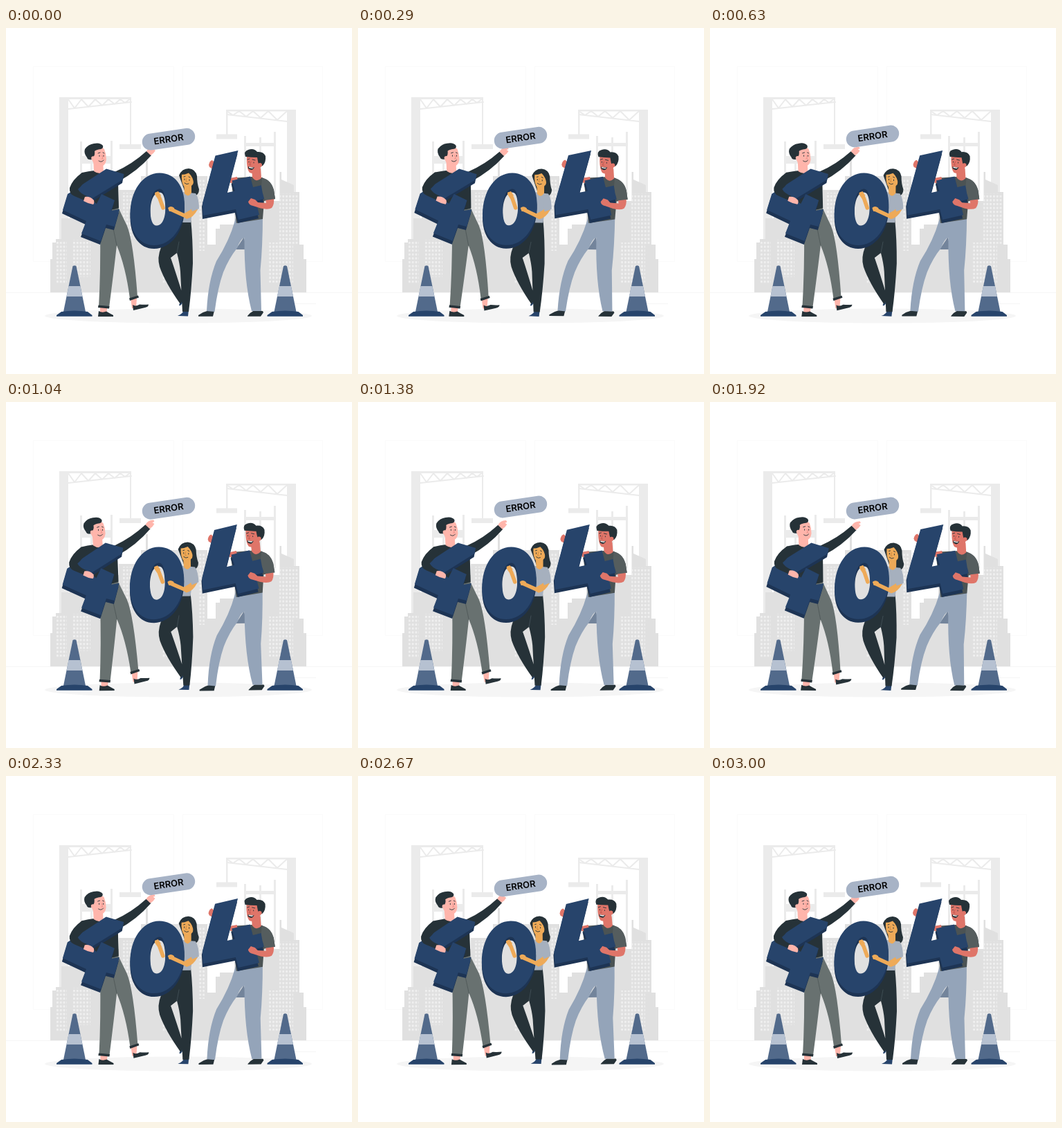
Write an HTML page that moves like this. It is 500 px wide and 500 px high and loops after 3040 ms.

```html
<!DOCTYPE html>
<html lang="en">
<head>
<meta charset="utf-8">
<title>Error 404</title>
<style>
html,body{margin:0;width:100%;height:100%;overflow:hidden;background:#fff}
svg{display:block;width:100%;height:100%}
.ink{fill:#263238}.navy{fill:#27446b}.deep{fill:#1d3454}
.pink{fill:#ffb5ab}.tan{fill:#eeaa58}.red{fill:#df7569}
.line{fill:none;stroke-linecap:round;stroke-linejoin:round}
text{font:600 13px Inter,"Open Sans",sans-serif;text-anchor:middle}
</style>
</head>
<body>
<svg viewBox="0 0 500 500">
<defs>
  <pattern id="dots" width="4.8" height="5.6" patternUnits="userSpaceOnUse"><path d="M1 1h2.8v3h-2.8z" fill="#f0f0f0"/></pattern>
  <g id="cone">
    <path d="M96.500 344Q99 342.500 101.500 344L115 410H83z" fill="#526a8b"/>
    <path d="M90.500 373H107.400L110.500 388H87.400z" fill="#b6c1d1"/>
    <path d="M73 415L80 410Q99 407 118 410L124.500 415V416.700H73z" class="navy"/>
  </g>
  <path id="four1" d="M145 203.500L170.500 211 169 219 122 248 131 254 138 240 157 249 152 264 164 262 157 287 145 284 137 308 109 297 116 279 82 263 89 240z"/>
  <path id="zero" fill-rule="evenodd" d="M222 209.500C244 209.500 258 229 258 255C258 288 239 314 214 314C193 314 179.500 295 179.500 269C179.500 236 197 209.500 222 209.500zM222 232.500C213 233 208.500 245 208.500 262C208.500 278 212 286 218 285.500C227 285 231 272 230.500 256C230 241 228 232.500 222 232.500z"/>
  <path id="four2" d="M302.500 184.500L335.500 177 319.500 238 331 235.500 326.500 220.500 353 214.500 357 230 370 227 373 247 361 250 366 270 336 277 332 262 285 271 284 253z"/>
</defs>

<!-- backdrop -->
<g fill="none" stroke="#fafafa"><path d="M39.500 55.500H242.500V337.500H39.500zM255.500 55.500H457.500V337.500H255.500z"/></g>
<path d="M0 382.500H500M402 398.500H448" stroke="#f5f5f5"/>
<g fill="#ebebeb">
  <path d="M77 100H90V310H77zM90 100H181V103H90zM179 100H181V168H179zM164 168H195V175H164z"/>
  <path d="M107 164H110V300H107zM122 168H125V300H122zM151 163H154V300H151zM107 185H154V196H107z"/>
  <path d="M406 118H419V240H406zM318 118H406V120.500H318zM318 118H320.500V154H318zM304 153.500H334V160.500H304z"/>
  <path d="M344 156H347V240H344zM366 158H369V240H366zM387 150H390V240H387zM344 166H390V171H344z"/>
</g>
<path class="line" stroke="#ebebeb" stroke-width="2" d="M90 117L181 107M90 103L99 116 109 103 119 114 129 103 139 112 148 103 157 110 165 103 172 108 180 102M319 125L406 135M319 120L328 126 337 120 347 128 357 120 368 130 379 120 392 133 406 120"/>
<path fill="#e0e0e0" d="M64 382V334H67V310H72V305H80V275H92V250H163V234H195V214H202V191H205V214H291V313H303V290H309V284H330V250H395.500V208H398V219L416 227V237H424V313H430V334H434V382z"/>
<path fill="url(#dots)" d="M73 307H88V370H73zM97 306H122V360H97zM167 238H187V304H167zM225 318H240V370H225zM279 217H289V322H279zM395 239H422V312H395zM379 310H415V368H379z"/>
<ellipse cx="249" cy="416" rx="193" ry="10.500" fill="#f5f5f5"/>
<use href="#cone"/><use href="#cone" x="304.500"/>

<!-- left man -->
<g id="man1">
  <path class="pink" d="M136 400H147L145 413H136zM180 390H189L188 405H182z"/>
  <path class="ink" d="M134 409Q139 412 145 409.500Q149 412 155 415V417H133zM183 400Q187 403 193 399.500Q200 400 206 399.500Q206 403 201 404L184 408z"/>
  <path fill="#687170" d="M137 257H161L175 286Q184 308 190 388L179 391Q173 345 160 314Q156 350 149 404H134Q137 350 136 290z"/>
  <path class="ink" d="M133.500 400.500L149.500 402 149 405.500 133 404zM178 390.500L191 386.500 192 389.500 179 394z"/>
  <path class="line" d="M160 314L154 285" stroke="#525b5b"/>
  <path class="ink" d="M110 209Q119 207 128 206L141 209 158 207.500Q182 197 203 178L210 184Q190 207 162 222L163 260Q150 265 136 262L118 250 100 244Q92 234 98 221z"/>
  <path class="pink" d="M126 190H140L141 209Q134 212 127 207z"/>
  <path class="pink" d="M203 178Q207 171 215 171.500L216 174 213 175 216 177 213 181 209 184z"/>
  <path class="pink" d="M124 178Q136 169 142 175Q145 182 145 190Q144 199 137 200Q127 199 124 190z"/>
  <path class="ink" d="M124 190Q118 191 117 187Q112 181 114 175Q119 168 127 167Q136 165 140 170Q141 174 137 175Q130 176 128 178Q129 183 126 187z"/>
  <circle class="pink" cx="126" cy="188" r="2.800"/>
  <path class="line" stroke="#263238" stroke-width=".9" d="M133 181L136 180M140 180L142 181M135 184V185.500M141 184V185.500M134 192Q138 195 141 191"/>
  <path class="line" stroke="#e98c86" stroke-width=".9" d="M138.500 184L140 189H138"/>
  <use href="#four1" x="-1" y="5" class="deep"/>
  <use href="#four1" class="navy"/>
  <path class="ink" d="M110 209Q96 219 92 231Q91 240 99 243L113 249 117 243Q107 239 104 233Q112 226 118 214z"/>
  <path class="pink" d="M114 244Q122 243 127 249Q128 253 126 255Q119 254 112 250z"/>
</g>

<!-- woman -->
<g id="woman">
  <path class="ink" d="M250 213Q254 203 264 203Q274 204 276 214Q276 225 279 233Q279 241 272 243L258 235z"/>
  <path class="navy" d="M250 401Q252 394 255 389L259 393 252 401zM248 416Q256 413 257 407H264L263 416.500z"/>
  <path class="ink" d="M244 276H267Q270 305 270 340Q268 380 264 410H255Q253 373 252 352Q251 340 247 325L238 332Q246 355 257 391L252 399Q230 368 222 345Q218 332 224 317z"/>
  <path class="line" stroke="#45535a" stroke-width=".8" d="M247 325L250 309"/>
  <path d="M255 237Q265 238 274 239Q280 247 277 263L269 267 267 281H246z" fill="#a6b0be"/>
  <path class="tan" d="M257 223H268V238Q263 246 258 239z"/>
  <path class="tan" d="M254 211Q262 203 270 210Q274 217 270 226Q265 232 258 230Q253 225 254 211z"/>
  <path class="ink" d="M252 212Q255 204 264 204Q275 207 274 223L271 225Q271 216 264 209.500Q259 212 252 212z"/>
  <path class="line" stroke="#263238" stroke-width=".9" d="M257 215L259 214.500M264 215L266 216M258 218V219.500M265 219V220.500M258 224Q261 227 264 225"/>
  <path class="line" stroke="#ca843b" stroke-width=".8" d="M261 217L260 222H262"/>
  <use href="#zero" x="0" y="5" class="deep"/>
  <use href="#zero" class="navy"/>
  <path class="line" stroke="#eeaa58" stroke-width="5.500" d="M218 240L222 246 227 260M274 260L260 272 238 262"/>
  <path class="tan" d="M215 238L220 236 224 242 222 246 217 243zM234 260Q238 256 243 260L244 265 236 265zM268 262H277Q271 274 261 276L254 270z"/>
  <path d="M268 240Q279 240 279 261L269 265Q264 252 268 240z" fill="#a6b0be"/>
</g>

<!-- right man -->
<g id="man2">
  <path class="ink" d="M278 415Q285 410 292 408.500H301L299 416.700H278zM349 416Q353 411 358 408.500L371 409 372 411 368 416.700H349z"/>
  <path fill="#73849b" d="M332 320L344 302 347 320z"/>
  <path fill="#94a4b9" d="M333 270H371Q371 315 367.500 350L369 409H355Q344 367 344.500 303Q339 304 334 318Q322 333 314 353Q306 375 301.500 410L290 409Q292 366 304 337Q323 307 331 278z"/>
  <path fill="#4b5354" d="M325 217L355 215 370 216Q383 220 387 234L389 247 373 250 371 276 333 282z"/>
  <path class="red" d="M355 203H368L369 217Q362 224 356 216zM324 217L334 215 335 222 324 224z"/>
  <path class="red" d="M348 184Q361 178 367 188Q370 198 366 207Q358 212 352 209Q347 203 348 184z"/>
  <path class="ink" d="M346 186Q343 178 350 176Q358 173 363 179Q372 178 375 185Q376 194 371 199L366 200Q364 194 363 187Q354 187 346 186z"/>
  <circle class="red" cx="367" cy="198" r="3"/>
  <path class="line" stroke="#263238" stroke-width=".9" d="M349 190L352 189M356 190L360 191M351 193V194M358 194V195"/>
  <path class="line" stroke="#b84f49" stroke-width=".8" d="M354 193L352 198H354"/>
  <path class="ink" d="M350 200Q355 202 359 201Q356 208 350 203z"/>
  <path fill="#fff" d="M351 200.500Q355 202 358 201.500L356 203 351 202z"/>
  <path class="red" d="M293 198Q294 192 298 191L302 195 299 204 294 201z"/>
  <use href="#four2" x="-1" y="5" class="deep"/>
  <use href="#four2" class="navy"/>
  <path class="red" d="M375 246H387Q388 255 384 260Q379 263 368 260.500L357 257Q351 256 350 251L354 246 360 248 364 252 376 253z"/>
  <path fill="#555d5e" d="M370 217Q383 219 387 234L389 247 374 249Q370 238 369 228z"/>
</g>

<g id="sign">
  <g transform="translate(235 160.700) rotate(-8.500)">
    <rect x="-38.500" y="-12" width="77" height="24" rx="12" fill="#a7b3c6"/>
    <text y="4.600">ERROR</text>
  </g>
</g>
</svg>
<script>
const el = id => document.getElementById(id);
// each figure sways about its own middle
const figures = [["man1", 149, 292], ["woman", 229, 311], ["man2", 336, 296]]
  .map(([id, x, y]) => ({ node: el(id), x, y }));
const sign = el("sign");
const triangle = p => 1 - Math.abs(1 - 2 * (p % 1));
const start = performance.now();

function draw(now) {
  const t = Math.max(0, now - start) % 3040;
  const angle = 2 * triangle(t / 1500 + 0.25) - 1;
  for (const f of figures)
    f.node.setAttribute("transform", `rotate(${angle} ${f.x} ${f.y})`);
  sign.setAttribute("transform", `translate(0 ${-10 * triangle(t / 3000)})`);
  requestAnimationFrame(draw);
}
draw(start);
</script>
</body>
</html>
```
